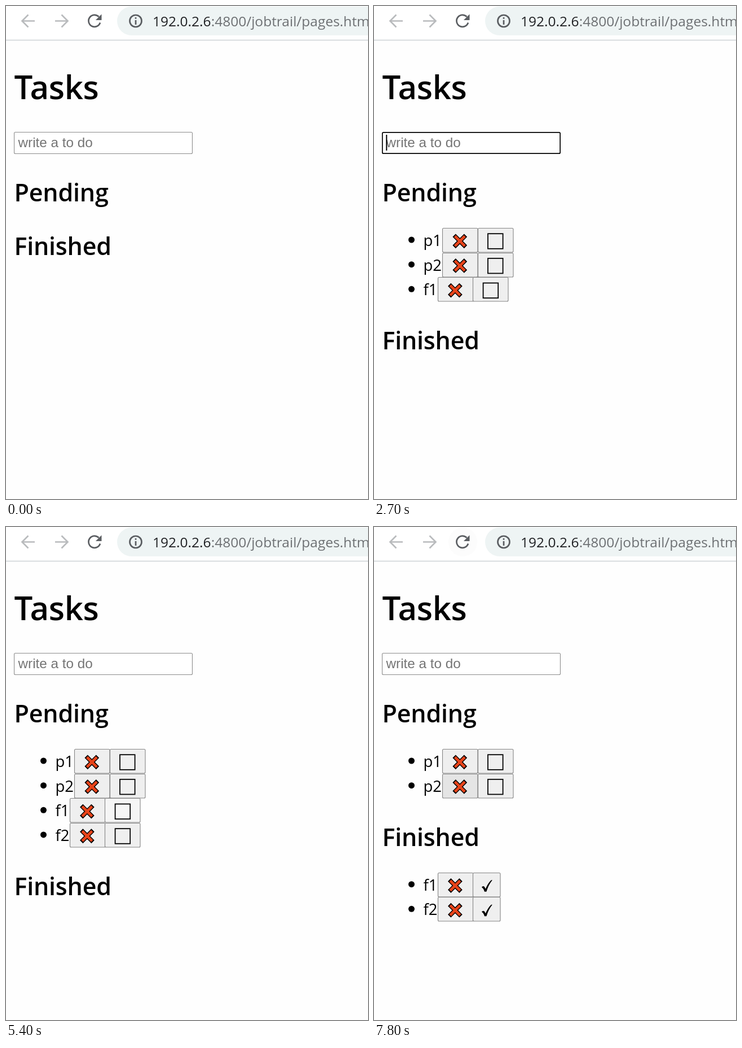
Recreate the animation shown at these times as an HTML page. Size 642 by 873 pixels, loop 8000 ms.

```html
<!DOCTYPE html>
<html lang="en">
<head>
<meta charset="utf-8">
<title>Tasks</title>
<style>
  html, body { margin: 0; width: 642px; height: 873px; overflow: hidden; background: #fefefe; }
  svg { display: block; font-family: "Open Sans", "Noto Sans", sans-serif; }
  .h1 { font-size: 58px; font-weight: 600; letter-spacing: -.3px; }
  .h2 { font-size: 43px; font-weight: 600; letter-spacing: -.2px; }
  .item { font-size: 27.5px; }
  .field { font: 24.3px "Liberation Sans", Arial, sans-serif; }
  .url { font-size: 24.5px; fill: #6d7073; }
  .icon { fill: none; stroke-width: 2.7; }
</style>
</head>
<body>
<svg width="642" height="873" viewBox="0 0 642 873">
  <rect width="642" height="60" fill="#fff"/>
  <rect y="59.5" width="642" height="2" fill="#d8dbde"/>
  <g id="glow"></g>
  <g class="icon" stroke="#b9bbbd">
    <path d="M51 26.5H29M39.5 15.5L28.5 26.5L39.5 37.5"/>
    <path d="M87 26.5H109M98.5 15.5L109.5 26.5L98.5 37.5"/>
  </g>
  <path class="icon" stroke="#5a5d61" d="M167 29.5A10.5 10.5 0 1 1 164.5 19"/>
  <path fill="#5a5d61" d="M169.5 14.5V25H159Z"/>
  <rect x="197" y="1" width="500" height="51" rx="25.5" fill="#eef4f4"/>
  <circle class="icon" cx="230" cy="26.5" r="10.5" stroke="#5a5d61"/>
  <path fill="#5a5d61" d="M228.7 20h2.7v2.7h-2.7zM228.7 25h2.7v8h-2.7z"/>
  <text class="url" x="260" y="36"><tspan fill="#202124">192.0.2.6</tspan>:4800/jobtrail/pages.htm</text>
  <text class="h1" x="14.5" y="165">Tasks</text>
  <text class="h2" x="14.5" y="346">Pending</text>
  <g id="page"></g>
</svg>
<script>
const LOOP = 8000, ROW = 43.65;
const glow = document.getElementById("glow");
const page = document.getElementById("page");

// Each step changes only the listed parts of the state.
const steps = [
  [0, { typed: "", edge: "idle", caret: false, pending: [], done: [], hot: "", tint: "#e5e5e5", glow: "" }],
  [200, { edge: "hover" }],
  [600, { edge: "focus", caret: true }],
  [1100, { typed: "p" }],
  [1200, { typed: "p1" }],
  [1400, { typed: "", pending: ["p1"] }],
  [1700, { typed: "p" }],
  [1800, { typed: "p2" }],
  [1900, { typed: "", pending: ["p1", "p2"] }],
  [2400, { typed: "f" }],
  [2500, { typed: "f1" }],
  [2700, { typed: "", pending: ["p1", "p2", "f1"] }],
  [2800, { typed: "f" }],
  [2900, { typed: "f2" }],
  [3000, { typed: "", pending: ["p1", "p2", "f1", "f2"] }],
  [3500, { caret: false }],
  [4000, { caret: true }],
  [4500, { caret: false }],
  [4700, { edge: "idle", glow: "hover" }],
  [4800, { glow: "" }],
  [5000, { hot: "p1 mark" }],
  [5100, { hot: "p2 mark" }],
  [5200, { hot: "f1 mark" }],
  [5400, { tint: "#f5f5f5" }],
  [5500, { tint: "#e5e5e5", hot: "f2 mark", pending: ["p1", "p2", "f2"], done: ["f1"] }],
  [6000, { tint: "#f5f5f5" }],
  [6100, { tint: "#e5e5e5", hot: "", pending: ["p1", "p2"], done: ["f1", "f2"] }],
  [6700, { hot: "p2 remove" }],
  [6800, { hot: "", edge: "hover" }],
  [6900, { edge: "idle" }],
  [7200, { glow: "ripple" }],
  [7300, { glow: "" }],
  [7600, { hot: "p1 remove" }],
  [7800, { hot: "p2 remove", glow: "faint" }]
];

const glows = {
  "": "",
  hover: '<circle cx="157.5" cy="26.5" r="25.5" fill="#f4f5f5"/>',
  ripple: '<circle cx="160.5" cy="23" r="12" fill="#f4f5f5"/>',
  faint: '<circle cx="157.5" cy="26.5" r="25.5" fill="#fcfcfc"/>'
};
const edges = { idle: ["#8c8c8c", 1.1], hover: ["#4f4f4f", 1.1], focus: ["#000", 1.7] };

const cross = (x, y) => [["#000", 7.6, 10.2], ["#e8441a", 4.8, 8.8]].map(([color, width, r]) =>
  `<path d="M${x - r} ${y - r}l${2 * r} ${2 * r}M${x + r} ${y - r}l${-2 * r} ${2 * r}" stroke="${color}" stroke-width="${width}"/>`).join("");

const box = (x, y) =>
  `<rect x="${x}" y="${y}" width="26.6" height="26.6" fill="none" stroke="#000" stroke-width="1.8"/>`;

const check = (x, y) =>
  `<path transform="translate(${x} ${y})" d="M-9 2Q-6-1-4 1.5L-2 5Q2-5 8-10.5H10Q3-2-.5 10H-4Q-5 5-9 2Z"/>`;

const button = (x, y, width, fill) =>
  `<rect x="${Math.round(x) + .5}" y="${Math.round(y) + .5}" width="${width}" height="42.5" rx="2" fill="${fill}" stroke="#858585" stroke-width="1.1"/>`;

function row(name, y, isDone, state) {
  const x = name[0] === "p" ? 121 : 112.6;
  const markX = x + 62.6;
  const fill = part => state.hot === `${name} ${part}` ? state.tint : "#efefef";
  return `<circle cx="66.5" cy="${y + 21}" r="5.5"/>
    <text class="item" x="87.5" y="${y + 32}">${name}</text>
    ${button(x, y, 62.5, fill("remove"))}${cross(x + 31.3, y + 23.3)}
    ${button(markX, y, isDone ? 48.5 : 62.5, fill("mark"))}
    ${isDone ? check(markX + 24.7, y + 24) : box(markX + 18.4, y + 10.2)}`;
}

function input({ typed, edge, caret }) {
  const [color, width] = edges[edge];
  const end = [...typed].reduce((sum, c) => sum + (c === "f" ? 6.75 : 13.5), 21.3);
  return `<rect x="${14 + width / 2}" y="${223 + width / 2}" width="${317 - width}" height="${39 - width}" rx="2" fill="#fff" stroke="${color}" stroke-width="${width}"/>
    <text class="field" x="21.5" y="250" fill="${typed ? "#000" : "#757575"}">${typed || "write a to do"}</text>
    ${caret ? `<rect x="${end}" y="228" width="2" height="28"/>` : ""}`;
}

function draw(state) {
  const { pending, done } = state;
  const finishedY = 441 + (pending.length ? 36.4 + ROW * pending.length : 0);
  const list = (names, headingY, isDone) =>
    names.map((name, i) => row(name, headingY + 47 + ROW * i, isDone, state)).join("");
  glow.innerHTML = glows[state.glow];
  page.innerHTML = input(state) + list(pending, 346, false) +
    `<text class="h2" x="14.5" y="${finishedY}">Finished</text>` +
    list(done, finishedY, true);
}

let shown = 0;
function tick() {
  const t = performance.now() % LOOP;
  const past = steps.filter(([at]) => at <= t);
  if (past.length !== shown) {
    shown = past.length;
    draw(Object.assign({}, ...past.map(([, change]) => change)));
  }
  requestAnimationFrame(tick);
}
tick();
</script>
</body>
</html>
```
